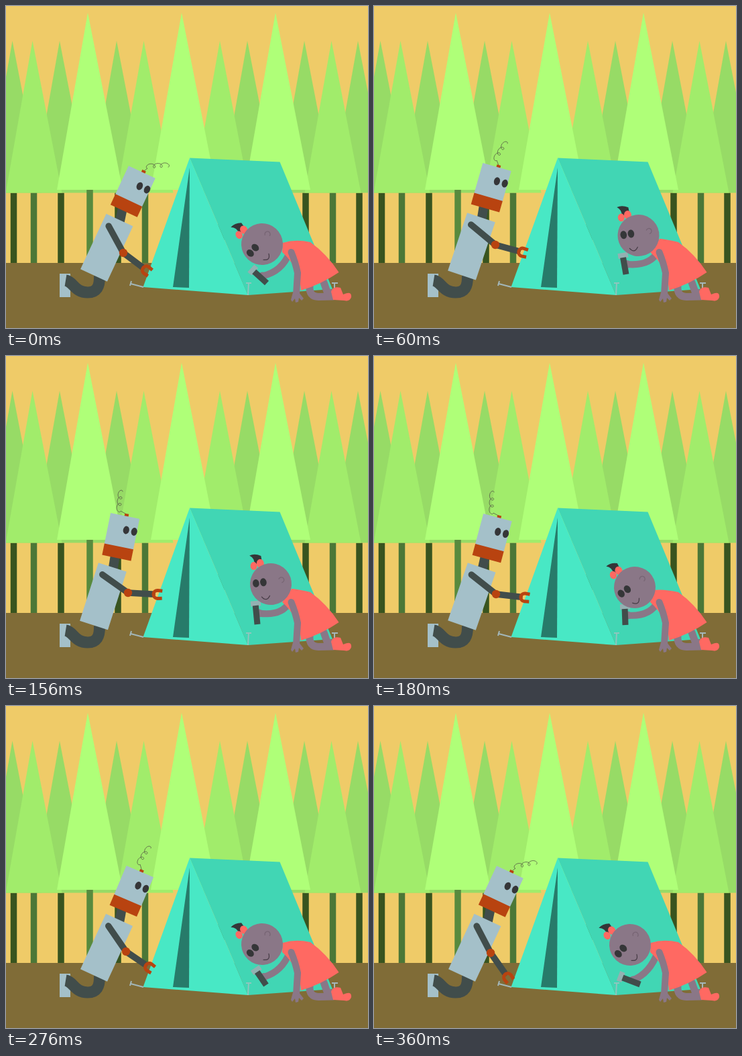
Animation of 540 by 480 pixels, one loop 420 ms. Source, as an HTML page:

```html
<!DOCTYPE html>
<html lang="en">
<head>
<meta charset="utf-8">
<title>Pitching a tent</title>
<style>
  html, body { margin: 0; width: 100%; height: 100%; overflow: hidden; }
  svg { display: block; width: 100vw; height: 100vh; }
</style>
</head>
<body>
<svg viewBox="0 0 540 480">
  <rect width="540" height="480" fill="#efcb68"/>
  <g id="forest"></g>
  <rect y="383" width="540" height="97" fill="#806c37"/>
  <g id="tent">
    <path d="M274 226.5L408.5 232.5L487 422L361 431Z" fill="#41d6b4"/>
    <path d="M274 226.5L361 431L204.500 419Z" fill="#48e8c5"/>
    <path d="M274 241L273 420L249 419Z" fill="#277b6a"/>
    <g fill="none" stroke="#a3b7ba" stroke-width="2">
      <path d="M187 410L185 417M186 414L205 419"/>
      <path d="M358 413H366M362 413L361 431" stroke="#8fc5bd"/>
      <path d="M486 413H495M490 413V424"/>
    </g>
  </g>
  <g id="robot"></g>
  <g id="girl"></g>
</svg>
<script>
const STEP = 60, STEPS = 7;
const METAL = '#a4c0c9', DARK = '#414d4b', RUST = '#b84310';
const SKIN = '#8a7787', CORAL = '#ff6962', INK = '#353638';
const $ = id => document.getElementById(id);

// Tilts, the head's base, the antenna's start and end, elbow and wrist.
const robotPoses = [
  { lean: 25, head: [176, 305, 25], coil: [211, 242, 242, 240], elbow: [175, 368], wrist: [203, 389] },
  { lean: 18.5, head: [166, 301, 16], coil: [183, 230, 199, 205], elbow: [181, 356], wrist: [214, 365] },
  { lean: 17.8, head: [165, 300.5, 11.5], coil: [171, 231, 174, 202], elbow: [182, 353], wrist: [218, 355] },
  { lean: 19, head: [168, 302, 15], coil: [178, 234, 179, 203], elbow: [182, 355], wrist: [217, 359] },
  { lean: 24.7, head: [175, 305, 23], coil: [200, 236, 216, 212], elbow: [179, 366], wrist: [207, 385] },
  { lean: 25, head: [176, 305, 25], coil: [211, 242, 242, 236], elbow: [174, 368], wrist: [195, 398] }
];

// Head centre and tilt, collar, elbow, hammer handle from top to end.
const girlPoses = [
  { head: [382, 355, -48], collar: [413, 353], elbow: [412, 396], handle: [368, 394, 389, 413] },
  { head: [394.5, 342, -9], collar: [426, 347], elbow: [411, 388], handle: [371, 372, 376, 400] },
  { head: [395, 340, -8], collar: [426, 347], elbow: [411, 388], handle: [372, 369, 375, 400] },
  { head: [389, 345, -35], collar: [416, 349], elbow: [411, 389], handle: [374, 374, 375, 401] },
  { head: [382, 355, -48], collar: [413, 353], elbow: [412, 396], handle: [373, 394, 388, 416] },
  { head: [382, 356, -48], collar: [413, 353], elbow: [412, 398], handle: [368, 404, 397, 415] }
];

const place = (x, y, angle, body) =>
  `<g transform="translate(${x} ${y}) rotate(${angle})">${body}</g>`;
const rect = (x, y, w, h, fill) =>
  `<rect x="${x}" y="${y}" width="${w}" height="${h}" fill="${fill}"/>`;
const oval = (x, y, rx, ry, fill) =>
  `<ellipse cx="${x}" cy="${y}" rx="${rx}" ry="${ry}" fill="${fill}"/>`;
const shape = (d, fill) => `<path d="${d}" fill="${fill}"/>`;
const line = (d, color, width, cap = 'round') =>
  `<path d="${d}" fill="none" stroke="${color}" stroke-width="${width}" stroke-linecap="${cap}" stroke-linejoin="round"/>`;
const degrees = (x, y) => Math.atan2(y, x) * 180 / Math.PI;

function spin([x, y], angle, [ox, oy]) {
  const a = angle * Math.PI / 180, c = Math.cos(a), s = Math.sin(a);
  return [ox + x * c - y * s, oy + x * s + y * c];
}

function drawForest() {
  const rows = [
    { xs: [9.5, 80, 165, 360, 445, 525], top: 52, base: 278.5, left: 40, right: 44, leaf: '#97db66', wood: '#38541f' },
    { xs: [39.5, 205.5, 319, 485.5], top: 52, base: 278.5, left: 40, right: 44, leaf: '#a1ec6b', wood: '#4b7737' },
    { xs: [122, 262, 402], top: 10, base: 274, left: 46, right: 52, leaf: '#afff78', wood: '#588a3e' }
  ];
  const tree = (r, x) =>
    rect(x + (r.right - r.left) / 2 - 4.75, r.base, 9.5, 383 - r.base, r.wood) +
    shape(`M${x} ${r.top}L${x + r.right} ${r.base}H${x - r.left}Z`, r.leaf);
  $('forest').innerHTML = rows.map(r => r.xs.map(x => tree(r, x)).join('')).join('');
}

function antenna(start, [sx, sy, ex, ey]) {
  const length = Math.hypot(ex - sx, ey - sy), tilt = degrees(ex - sx, ey - sy);
  const points = [start];
  for (let i = 0; i <= 60; i++) {
    const t = i / 60, a = t * 6 * Math.PI;
    points.push(spin([length * t - 3.8 * Math.sin(a), 3.2 * (Math.cos(a) - 1)], tilt, [sx, sy]));
  }
  return line('M' + points.map(p => p.map(v => v.toFixed(1))).join('L'), '#555a45', 0.8);
}

function drawRobot({ lean, head, coil, elbow, wrist }) {
  const [hx, hy, tilt] = head;
  const hip = [131, 401.5];
  const shoulder = spin([-11, -76], lean, hip);
  const chest = spin([2, -86], lean, hip);
  const foreAngle = degrees(wrist[0] - elbow[0], wrist[1] - elbow[1]);
  const claw = line('M15 -5.5L8 -6A6 6 0 0 0 8 6L15 5.5', RUST, 5, 'butt');
  $('robot').innerHTML =
    rect(80, 399, 16, 35, METAL) +
    line('M89 409C101 411 102 427 122 427C135 427 140 419 139.500 402', DARK, 17, 'butt') +
    line(`M${hx - 2} ${hy - 4}L${chest}`, DARK, 14, 'butt') +
    place(...hip, lean, rect(-22, -91, 44, 91, METAL)) +
    antenna(spin([2, -66], tilt, [hx, hy]), coil) +
    place(hx, hy, tilt,
      rect(-1, -67, 6, 5, RUST) + rect(-22, -63.5, 44, 47.5, METAL) + rect(-22, -17, 44, 17.5, RUST) +
      oval(5.8, -43, 4.5, 6, INK) + oval(18, -43, 4.5, 6, INK)) +
    line(`M${shoulder}L${elbow}L${wrist}`, DARK, 9.5) +
    oval(...elbow, 6.2, 6.2, RUST) +
    place(...wrist, foreAngle, claw);
}

function drawGirl({ head, collar, elbow, handle }) {
  const [ax, ay, bx, by] = handle;
  const [hx, hy, tilt] = head;
  const length = Math.hypot(bx - ax, by - ay);
  const hand = [ax + (bx - ax) * 0.5 + 4, ay + (by - ay) * 0.5 - 1];
  const hammer = rect(-4, -8, 8, 15, '#93b1b2') + rect(3, -4.5, length - 3, 9, DARK);
  const hair =
    shape('M-28 -45Q-20 -48 -11 -43L-10 -31H-22Q-20 -40 -28 -45Z', INK) +
    oval(-23, -29, 5, 6, CORAL) + oval(-13, -32, 5.5, 6.5, CORAL);
  const face =
    oval(0, 0, 31, 31, SKIN) +
    oval(-21.8, -4.2, 4.8, 6, INK) + oval(-10.6, -4.2, 4.8, 6, INK) +
    line('M-16 17Q-10 26 -4 17', '#443b44', 1.2) +
    line('M13 -6A4 4 0 1 1 17 0', '#776574', 1.3);
  $('girl').innerHTML =
    line('M474 412L479 426L488 429', SKIN, 11) +
    line('M453 418Q452 433 466 433.500L488 433', SKIN, 11) +
    shape('M488 438L485 426Q487 417 499 420L503 430Q516 424 515 434Q513 441 504 439Z', CORAL) +
    line(`M423 367Q${elbow} ${hand}`, SKIN, 10) +
    oval(...hand, 6, 6, SKIN) +
    place(ax, ay, degrees(bx - ax, by - ay), hammer) +
    shape(`M${collar}Q432 347 454 352Q479 370 496.500 397Q470 415 440 424Q438 390 412 367Z`, CORAL) +
    line('M425.500 367Q432 383 435 398L433 430', SKIN, 10) +
    shape('M428 427H437L444 436L441 439L437 435L436 441L432 442L431 436L427 441L425 438Z', SKIN) +
    // The bun lags behind the head as it tips.
    place(hx, hy, tilt * 0.62, hair) +
    place(hx, hy, tilt, face);
}

let shown = -1;
const begin = performance.now();

function update(now) {
  const step = Math.floor(Math.max(0, now - begin) / STEP) % STEPS;
  if (step !== shown) {
    const pose = Math.min(step, robotPoses.length - 1);
    drawRobot(robotPoses[pose]);
    drawGirl(girlPoses[pose]);
    shown = step;
  }
  requestAnimationFrame(update);
}

drawForest();
update(begin);
</script>
</body>
</html>
```
